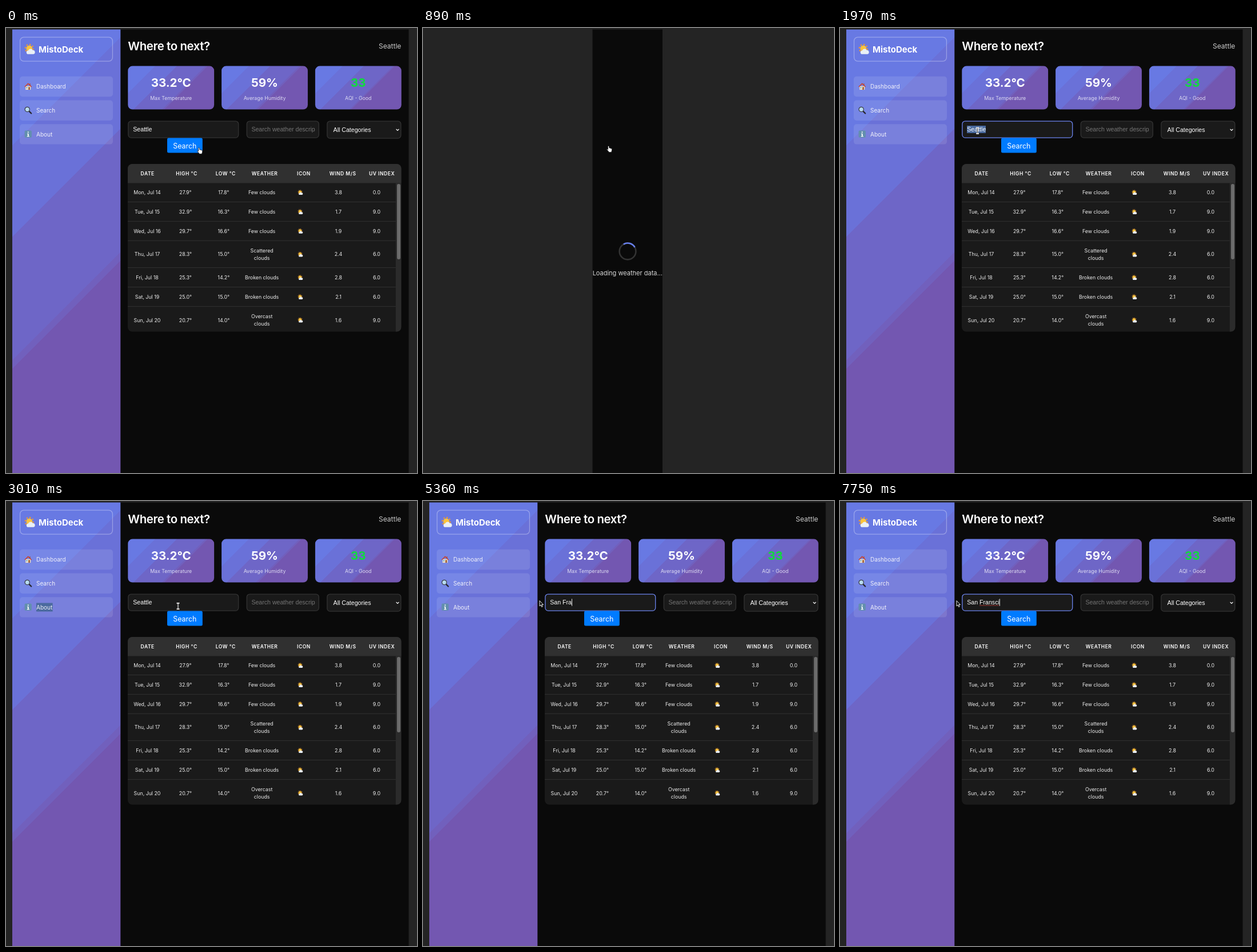
These frames come from a looping animation (719 px wide and 779 px high, 8000 ms). An HTML page:

```html
<!DOCTYPE html>
<html lang="en">
<head>
<meta charset="utf-8">
<title>Weather dashboard</title>
<style>
  html, body { margin: 0; width: 719px; height: 779px; overflow: hidden; background: #242424; }
  svg { display: block; }
  text { font-family: Inter, sans-serif; white-space: pre; }
  .field { font-family: "Liberation Sans", sans-serif; font-size: 10.6px; }
</style>
</head>
<body>
<svg id="stage" width="719" height="779" viewBox="0 0 719 779">
  <defs>
    <clipPath id="tableClip"><rect x="213" y="238" width="478.5" height="293.5" rx="8"/></clipPath>
    <g id="sunCloud">
      <circle cx="7" cy="6.6" r="5.9" fill="none" stroke="#f29a2e" stroke-width="1.8" stroke-dasharray="2.2 2.43"/>
      <circle cx="7" cy="6.6" r="4.5" fill="#fcc43c"/>
      <path d="M5.4 15a2.6 2.6 0 0 1 0-5.2 3.6 3.6 0 0 1 6.7-.7 3 3 0 0 1 1 5.9z" fill="#e9eff6"/>
    </g>
    <g id="house">
      <path d="M2.3 6.5h9.4V13H2.3z" fill="#f0dfc2"/>
      <path d="M9.4 1.8h1.7V5H9.4z" fill="#a8553f"/>
      <path d="M.4 7.3 7 .8l6.6 6.5-1 1L7 3 1.4 8.3z" fill="#c8412f"/>
      <path d="M3.4 8h2.4v2.5H3.4z" fill="#6fb2dd"/>
      <path d="M7.6 8h2.6v5H7.6z" fill="#98562f"/>
    </g>
    <g id="lens">
      <path d="m8.4 8.4 4.3 4.3" stroke="#26262c" stroke-width="2.4" stroke-linecap="round"/>
      <circle cx="5.4" cy="5.4" r="4.3" fill="#b8dcf0" stroke="#3c3f48" stroke-width="1.3"/>
    </g>
    <g id="info">
      <rect x=".6" y=".6" width="12.8" height="12.8" rx="2" fill="#628fae"/>
      <path d="M5.3 6H8v4.4h1.2v1.2H5v-1.2h1.2V7.2h-.9zM6 2.5h2v2H6z" fill="#fff"/>
    </g>
  </defs>
  <g id="dashboard"></g>
  <g id="loading">
    <path d="M296.5 2.5h122.5V779H296.5z" fill="#0a0a0a"/>
    <g fill="none" stroke-width="2.6">
      <circle cx="358" cy="391" r="14.4" stroke="#333"/>
      <path id="spinner" d="M347.8 380.8a14.4 14.4 0 0 1 20.4 0" stroke="#667eea"/>
    </g>
    <text x="357.8" y="432.5" font-size="11" text-anchor="middle" fill="#d8d8d8">Loading weather data...</text>
  </g>
  <g id="cursor" stroke-linejoin="round">
    <path id="hand" d="M-1 .9C-.8-.3.8-.3 1 .9L1.3 3.7C2 3.1 2.8 3.3 3 4.1 3.7 3.7 4.5 4 4.6 4.7 5.4 4.4 6.2 4.9 6.2 5.7L5.8 8.7 5 10.9H.6L-.2 9.3-2.8 6.5C-3.2 5.7-2.3 5.2-1.6 5.7L-.9 6.3z" fill="#fff" stroke="#111" stroke-width=".8"/>
    <path id="arrow" d="M0 0v9.4l2.2-2 1.5 3.5 1.5-.7-1.5-3.3h2.9z" fill="#0a0a0a" stroke="#fff" stroke-width=".9"/>
    <g id="beam" fill="none">
      <path id="beamLine" d="M-2.2-5.2Q0-5 0-4V4Q0 5-2.2 5.2M2.2-5.2Q0-5 0-4M0 4Q0 5 2.2 5.2" stroke="#e8e8e8" stroke-width="2.1"/>
      <use href="#beamLine"/>
      <path d="M0-4.4V4.4" stroke="#111" stroke-width=".8"/>
    </g>
  </g>
</svg>
<script>
const $ = id => document.getElementById(id);
const LOOP = 8000;

// ---------- static dashboard ----------
const rect = (x, y, w, h, fill, r = 0, extra = '') =>
  `<rect x="${x}" y="${y}" width="${w}" height="${h}" rx="${r}" fill="${fill}" ${extra}/>`;
const text = (str, x, y, size, fill = '#fff', extra = '') =>
  `<text x="${x}" y="${y}" font-size="${size}" fill="${fill}" ${extra}>${str}</text>`;
const centered = (str, x, y, size, fill, extra = '') =>
  text(str, x, y, size, fill, 'text-anchor="middle" ' + extra);
const icon = (name, x, y, scale = 1) =>
  `<use href="#${name}" transform="translate(${x} ${y}) scale(${scale})"/>`;

// Diagonal blue-to-violet fill made of flat bands.
const bands = [[0, '#6879e3'], [.21, '#6a71d8'], [.376, '#6e66c7'], [.6, '#7160bd'], [.615, '#7357b1']];
function gradientRect(id, x, y, w, h, r) {
  const half = (w + h) / 2;
  const stops = bands.map(([at, color], i) => {
    const end = i + 1 < bands.length ? bands[i + 1][0] : 1;
    return `<stop offset="${at}" stop-color="${color}"/><stop offset="${end}" stop-color="${color}"/>`;
  }).join('');
  return `<linearGradient id="${id}" gradientUnits="userSpaceOnUse" x1="${x}" y1="${y}"
    x2="${x + half}" y2="${y + half}">${stops}</linearGradient>` + rect(x, y, w, h, `url(#${id})`, r);
}

function sidebar() {
  const items = [['Dashboard', 'house'], ['Search', 'lens'], ['About', 'info']];
  return gradientRect('side', 11, 2.5, 189.3, 776.5, 0) +
    rect(24.6, 16.1, 161.8, 42, 'none', 6.5, 'stroke="#fff" stroke-opacity=".32" stroke-width="1.3"') +
    icon('sunCloud', 32.5, 28, 1.18) +
    text('MistoDeck', 57, 43, 15, '#fff', 'font-weight="700"') +
    items.map(([label, name], i) => {
      const y = 84.8 + i * 41.7;
      return rect(24, y, 163, 35.4, '#fff', 5, 'fill-opacity=".1"') + icon(name, 32, y + 10.8, .96) +
        (label === 'About' ? rect(53, 178.5, 28.6, 15, '#4a6a9e', 0, 'id="aboutMark"') : '') +
        text(label, 53, y + 21.6, 10, '#f1f1fa');
    }).join('');
}

function cards() {
  const data = [['33.2°C', 'Max Temperature', '#fff'], ['59%', 'Average Humidity', '#fff'], ['33', 'AQI - Good', '#0fdc3c']];
  return data.map(([value, label, color], i) => {
    const x = 213.3 + i * 163.8, mid = x + 75.4;
    return gradientRect('card' + i, x, 66.6, 150.8, 76, 8) +
      centered(value, mid, 103, 20.5, color, 'font-weight="700"') +
      centered(label, mid, 126.4, 8.8, '#dcdaf2');
  }).join('');
}

function controls() {
  const box = (x, w, h, id) =>
    rect(x, 163.1, w, h, '#1a1a1a', 5, `id="${id}" stroke="#333" stroke-width="1.3"`);
  return box(213.9, 192.8, 29, 'cityBox') + box(421.3, 126, 29, 'filterBox') + box(561.8, 129, 30, 'categoryBox') +
    rect(222, 171, 33, 13, '#4a6a9e', 0, 'id="cityMark"') +
    '<text id="city" class="field" x="222.3" y="181" fill="#fff"></text>' +
    rect(0, 171.3, .9, 12.4, '#fff', 0, 'id="caret"') +
    '<path id="spelling" d="M244.5 182.9H278.5" stroke="#e5453d" stroke-width="1.1" stroke-dasharray="1.3 1.1"/>' +
    text('Search weather descrip', 429.4, 181, 10.6, '#757575', 'class="field"') +
    text('All Categories', 572.6, 181.6, 10.6, '#fff', 'class="field"') +
    '<path d="m682.6 177 2.4 2.4 2.4-2.4" fill="none" stroke="#fff" stroke-width="1.1"/>' +
    rect(282, 192.6, 61.8, 26, '#007bff', 2.5, 'id="button"') +
    centered('Search', 312.9, 210.6, 12.4);
}

function table() {
  const heads = ['DATE', 'HIGH °C', 'LOW °C', 'WEATHER', 'ICON', 'WIND M/S', 'UV INDEX'];
  const rows = [
    ['Mon, Jul 14', '27.9°', '17.8°', 'Few clouds', '3.8', '0.0'],
    ['Tue, Jul 15', '32.9°', '16.3°', 'Few clouds', '1.7', '9.0'],
    ['Wed, Jul 16', '29.7°', '16.6°', 'Few clouds', '1.9', '9.0'],
    ['Thu, Jul 17', '28.3°', '15.0°', 'Scattered|clouds', '2.4', '6.0'],
    ['Fri, Jul 18', '25.3°', '14.2°', 'Broken clouds', '2.8', '6.0'],
    ['Sat, Jul 19', '25.0°', '15.0°', 'Broken clouds', '2.1', '6.0'],
    ['Sun, Jul 20', '20.7°', '14.0°', 'Overcast|clouds', '1.6', '9.0']];
  let out = rect(213, 238, 479, 294, '#1a1a1a') + rect(213, 238, 479, 33.4, '#303030');
  heads.forEach((head, i) => {
    out += centered(head, 247.7 + i * 68.3, 257.8, 8.5, '#fff', 'font-weight="600" letter-spacing=".55"');
  });
  let top = 271;
  for (const row of rows) {
    const [date, high, low, weather, wind, uv] = row;
    const lines = weather.split('|');
    const height = lines.length > 1 ? 47.3 : 33.9;
    const mid = top + height / 2;
    [date, high, low, null, null, wind, uv].forEach((cell, i) => {
      if (cell) out += centered(cell, 247 + i * 66.9, mid + 3.1, 8.8, '#eee');
    });
    lines.forEach((line, i) => {
      out += centered(line, 447.6, mid + 3.1 + (i - (lines.length - 1) / 2) * 13.4, 8.8, '#eee');
    });
    out += icon('sunCloud', 510.4, mid - 4.6, .58);
    top += height;
    out += rect(213, top - .9, 469, .9, '#333');
  }
  out += rect(681.8, 271.4, 10, 261, '#2b2b2b') + rect(684, 273, 6, 132, '#6b6b6b', 3);
  return `<g clip-path="url(#tableClip)">${out}</g>`;
}

$('dashboard').innerHTML =
  rect(11, 2.5, 693.5, 777, '#0a0a0a') + sidebar() +
  text('Where to next?', 213.3, 39.3, 20.4, '#fff', 'font-weight="600" letter-spacing="-.4"') +
  text('Seattle', 691.3, 36.2, 12, '#ccc', 'text-anchor="end"') +
  cards() + controls() + table();

// ---------- motion ----------
const between = (t, from, to) => t >= from && t < to;
const show = (id, on) => $(id).setAttribute('visibility', on ? 'visible' : 'hidden');
const set = (id, attrs) => { for (const k in attrs) $(id).setAttribute(k, attrs[k]); };

// time, x, y of the pointer hot spot
const pointerPath = [
  [0, 337.5, 209.5], [130, 337.5, 209.5], [700, 324.5, 206.5], [1180, 324.5, 206.5],
  [1320, 320, 214], [1700, 268, 179], [1850, 262, 179], [2070, 181, 182],
  [2350, 178, 189], [2550, 178, 189], [2940, 301, 184], [3100, 301, 184],
  [3250, 207, 176], [3550, 204, 174.6], [LOOP, 204, 174.6]];

// The pointer is refreshed only every 148 ms.
function pointerAt(t) {
  const held = Math.floor(t / 148) * 148;
  const i = pointerPath.findIndex(p => p[0] > held);
  const [t0, x0, y0] = pointerPath[i - 1], [t1, x1, y1] = pointerPath[i];
  const u = (held - t0) / (t1 - t0), ease = u * u * (3 - 2 * u);
  return [x0 + (x1 - x0) * ease, y0 + (y1 - y0) * ease];
}

function pointerShape(x, y) {
  const inside = (l, t, r, b) => x > l && x < r && y > t && y < b;
  if (inside(213, 162, 408, 192.5)) return 'beam';
  return inside(282, 192.5, 344, 219) || inside(24, 85, 187, 204) ? 'hand' : 'arrow';
}

const query = 'San Fransci';
const keyTimes = [4030, 4330, 4480, 4620, 4920, 5070, 5360, 5510, 5810, 6410, 6560];

function draw(t) {
  const loading = between(t, 890, 1070);
  $('dashboard').style.display = loading ? 'none' : '';
  $('loading').style.display = loading ? '' : 'none';
  set('spinner', { transform: `rotate(${15 + Math.floor((t - 890) / 180) * 65} 358 391)` });

  const pressed = between(t, 740, 890);
  set('button', { stroke: pressed ? '#d6e9ff' : 'none', 'stroke-width': 1.3 });

  const focused = between(t, 1820, 2270) || t >= 3150;
  set('cityBox', { stroke: focused ? '#6c84ee' : '#333' });
  show('aboutMark', between(t, 2420, 3150));

  const typed = keyTimes.filter(k => t >= k).length;
  $('city').textContent = typed ? query.slice(0, typed) : 'Seattle';
  show('cityMark', between(t, 1970, 2270) || between(t, 3300, 4030));
  set('caret', { x: 222.3 + $('city').getComputedTextLength() });
  show('caret', !loading && typed && !between(t, 7160, 7610));
  show('spelling', t >= 7750);

  const [x, y] = pointerAt(t), shape = pointerShape(x, y);
  set('cursor', { transform: `translate(${x} ${y})` });
  for (const id of ['hand', 'arrow', 'beam']) $(id).style.display = id === shape ? '' : 'none';
}

const start = performance.now();
function tick() {
  draw((performance.now() - start) % LOOP);
  requestAnimationFrame(tick);
}
tick();
</script>
</body>
</html>
```
